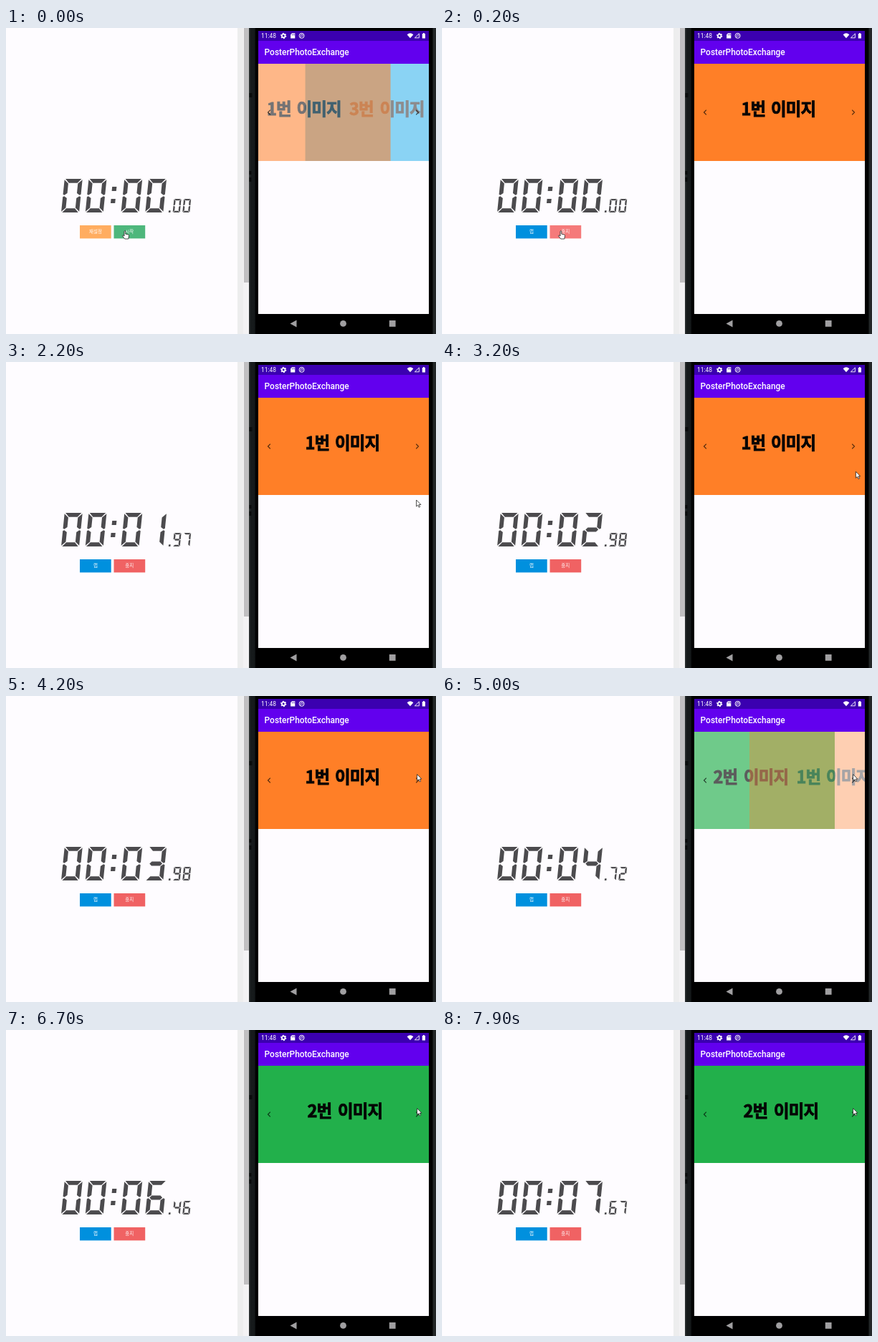
These frames come from a looping animation (600 px wide and 428 px high, 8000 ms). An HTML page:

```html
<!DOCTYPE html>
<html lang="ko">
<head>
<meta charset="utf-8">
<title>Stopwatch and banner</title>
<style>
  html, body { margin: 0; width: 100%; height: 100%; overflow: hidden; background: #fefcff; }
  svg { display: block; width: 100%; height: 100%; }
  .ui { font-family: Roboto, sans-serif; fill: #fff; }
  .ko { font-family: "Noto Sans CJK KR", "Noto Sans CJK", sans-serif; }
  .btn { font-size: 6.5px; fill: #fff; text-anchor: middle; }
  .label { font-size: 23.5px; font-weight: 900; letter-spacing: -.9px; fill: #050505; stroke: #050505; stroke-width: .8; }
  .chevron { fill: none; stroke: #000; stroke-opacity: .68; stroke-width: 1.2; }
</style>
</head>
<body>
<svg viewBox="0 0 600 428" preserveAspectRatio="none">
  <defs>
    <clipPath id="view"><rect x="352" y="50" width="238" height="136"/></clipPath>
    <linearGradient id="bezel">
      <stop offset="0" stop-color="#303536"/>
      <stop offset=".2" stop-color="#171b1c"/>
      <stop offset=".6" stop-color="#15191a"/>
      <stop offset=".75" stop-color="#000"/>
    </linearGradient>
  </defs>

  <rect width="600" height="428" fill="#fefcff"/>
  <rect x="323" width="8" height="428" fill="#ededee"/>
  <rect x="331" width="8" height="428" fill="#f3f2f4"/>
  <rect x="332" width="7" height="356" fill="#c0bfc1"/>

  <!-- stopwatch -->
  <g fill="#4c4b4e">
    <g id="digits"></g>
    <path d="M148.2 222h6.2l-.6 6h-6.2zM146.6 239h6.2l-.6 6h-6.2zM227.1 255.3h2.6l-.3 2.7h-2.6z"/>
  </g>
  <g class="ko btn">
    <rect id="leftBox" x="103" y="276" width="43.7" height="18.4"/>
    <text id="leftText" x="125" y="287.4"></text>
    <rect id="rightBox" x="150.5" y="276" width="43.7" height="18.4"/>
    <text id="rightText" x="172.3" y="287.4"></text>
  </g>

  <!-- phone -->
  <rect x="339" width="261" height="428"/>
  <rect x="339" width="13" height="428" fill="url(#bezel)"/>
  <rect x="595.5" width="4.5" height="428" fill="#222627"/>
  <path d="M339.5 91h4v6h-4zM339.5 200h3v5h-3zM339.5 209h3v6h-3z" fill="#0a0c0c"/>
  <rect x="352" y="4" width="238" height="396" fill="#fefcff"/>
  <rect x="352" y="4" width="238" height="14" fill="#3b00b0"/>
  <rect x="352" y="18" width="238" height="32" fill="#6200ee"/>
  <text class="ui" x="356" y="14" font-size="8.4">11:48</text>
  <text class="ui" x="360.6" y="38.2" font-size="11.9" font-weight="500">PosterPhotoExchange</text>
  <g fill="#fff">
    <circle cx="387.2" cy="11" r="2.3" fill="none" stroke="#fff" stroke-width="1.7"/>
    <circle cx="387.2" cy="11" r="3.6" fill="none" stroke="#fff" stroke-width="1.1" stroke-dasharray="1.9 1.87"/>
    <path d="M399 7.2h4.3v7.4h-6.2V9.2z"/>
    <path d="M399.2 8.7v1.6M400.8 8.4v1.9M402.3 8.4v1.9" stroke="#3b00b0" stroke-width=".7"/>
    <circle cx="412.6" cy="10.8" r="3.5" fill="none" stroke="#fff" stroke-width="1"/>
    <path d="M411.3 12.8V10.3a1.5 1.5 0 1 1 1.5 1.6" fill="none" stroke="#fff" stroke-width=".9"/>
    <path d="M559.6 9.2Q564 5.4 568.4 9.2L564 14.3z"/>
    <path d="M576.4 7.9v5.9h-6z" fill="none" stroke="#fff" stroke-width=".9"/>
    <path d="M580.8 8h1.2V7h1.8v1h1.2v6.4h-4.2z"/>
  </g>

  <g clip-path="url(#view)" id="banners"></g>
  <path class="chevron" d="M368.8 114.6l-3.3 3.4 3.3 3.4M572.2 114.6l3.3 3.4-3.3 3.4"/>

  <g fill="#a09fa1">
    <path d="M396.5 413.4l9-5v10z"/>
    <circle cx="470.5" cy="413.4" r="4.4"/>
    <rect x="534.8" y="409" width="8.8" height="8.8"/>
  </g>

  <g id="pointer" fill="#fff" stroke="#222" stroke-width=".8" stroke-linejoin="round">
    <path id="arrow" d="M0 0v9l2.1-1.9 1.5 3.2 1.5-.7-1.5-3.1h2.8z"/>
    <path id="hand" d="M0 .8q.9-1.3 1.8 0V4.6l3.8.9q1.1.4.9 1.6L5.8 11.5H.7L-2.3 7.6q-.4-1.3 1-1L0 7.5z"/>
  </g>
</svg>

<script>
const LOOP = 8000, STEP = 100, SLIDE = 400, HALF = 119;
const NS = "http://www.w3.org/2000/svg";
const $ = id => document.getElementById(id);
const clamp = v => Math.max(0, Math.min(1, v));
const ease = x => .5 - .5 * Math.cos(Math.PI * clamp(x));

function add(parent, tag, attrs, text) {
  const el = document.createElementNS(NS, tag);
  for (const k in attrs) el.setAttribute(k, attrs[k]);
  if (text) el.textContent = text;
  return parent.appendChild(el);
}

// Seven-segment digits, built from three shapes and their mirrors
const W = 25, H = 47, T = 5.8, G = .7, M = H / 2;
const flipX = pts => pts.map(([x, y]) => [W - x, y]);
const flipY = pts => pts.map(([x, y]) => [x, H - y]);
const top_ = [[G + .6, 0], [W - G - .6, 0], [W - T - G, T], [T + G, T]];
const side = [[0, G + .6], [T, T + G], [T, M - T / 2 - G], [T / 3, M - G], [0, M - G - 1]];
const mid = [[T / 2 + G, M], [T + G, M - T / 2], [W - T - G, M - T / 2],
  [W - T / 2 - G, M], [W - T - G, M + T / 2], [T + G, M + T / 2]];
const shapes = { a: top_, b: flipX(side), c: flipX(flipY(side)), d: flipY(top_), e: flipY(side), f: side, g: mid };
const lit = ["abcdef", "bc", "abdeg", "abcdg", "bcfg", "acdfg", "acdefg", "abc", "abcdefg", "abcdfg"];
const glyph = n => [...lit[n]].map(s => "M" + shapes[s].map(p => p.join(" ")).join("L") + "Z").join("");

// Each cell stands on the baseline and leans to the right
const cells = [[77, 1], [110.7, 1], [160.5, 1], [194.3, 1], [232.6, .404], [246.2, .404]].map(([x, s]) =>
  add($("digits"), "path", { transform: `translate(${x} 258) scale(${s}) skewX(-5.8) translate(0 ${-H})` }));

// Banner 1 lies above the others
function banner(color, num, numX, wordX) {
  const g = add($("banners"), "g", {});
  add(g, "rect", { x: 352, y: 50, width: 238, height: 136, fill: color });
  const label = add(g, "text", { class: "ko label", y: 122 });
  add(label, "tspan", { x: numX }, num + "번");
  add(label, "tspan", { x: wordX }, "이미지");
  return g;
}
const third = banner("#00a2e8", 3, 413.5, 456);
const second = banner("#22b04b", 2, 420.5, 463);
const first = banner("#ff7f27", 1, 417.5, 459);

function place(g, x, alpha) {
  g.setAttribute("transform", `translate(${x} 0)`);
  g.setAttribute("opacity", alpha);
}

// Linear interpolation over [time, ...values] keys
function track(keys, t) {
  const i = keys.findIndex(k => k[0] > t);
  if (i < 0) return keys[keys.length - 1].slice(1);
  const a = keys[i - 1], b = keys[i], u = (t - a[0]) / (b[0] - a[0]);
  return a.slice(1).map((v, j) => v + (b[j + 1] - v) * u);
}
const clock = [[0, 0], [210, 0], [1000, 79], [2200, 197], [4200, 398], [5000, 472], [6700, 646], [7900, 767], [8000, 777]];
const path = [[0, 165, 283.5], [1300, 165, 283.5], [1800, 580, 215], [2100, 572.6, 193], [2900, 572.6, 193],
  [3300, 579, 140], [3600, 573.6, 109.6], [8000, 573.6, 109.6]];

function button(side, color, text) {
  $(side + "Box").setAttribute("fill", color);
  $(side + "Text").textContent = text;
}

function render(t) {
  const count = Math.round(track(clock, t)[0]);
  const digits = String(count).padStart(6, "0");
  cells.forEach((c, i) => c.setAttribute("d", glyph(+digits[i])));

  const [x, y] = track(path, t);
  const hover = x > 150 && x < 195 && y > 276;
  if (t < 200) {
    button("left", "#ffad60", "재설정");
    button("right", "#4eb77c", "시작");
  } else {
    button("left", "#0090de", "랩");
    button("right", hover ? "#f57a7a" : "#f06263", "중지");
  }
  $("pointer").setAttribute("transform", `translate(${x} ${y})`);
  $("hand").style.display = hover ? "" : "none";
  $("arrow").style.display = hover ? "none" : "";

  const p = ease((t + 213) / SLIDE), q = ease((t - 4762) / SLIDE);
  place(third, HALF * p, 1 - p);
  place(second, HALF * (q - 1), q);
  place(first, HALF * (p - 1 + q), p * (1 - q));
}

function tick() {
  render(Math.floor(performance.now() % LOOP / STEP) * STEP);
  requestAnimationFrame(tick);
}
tick();
</script>
</body>
</html>
```
